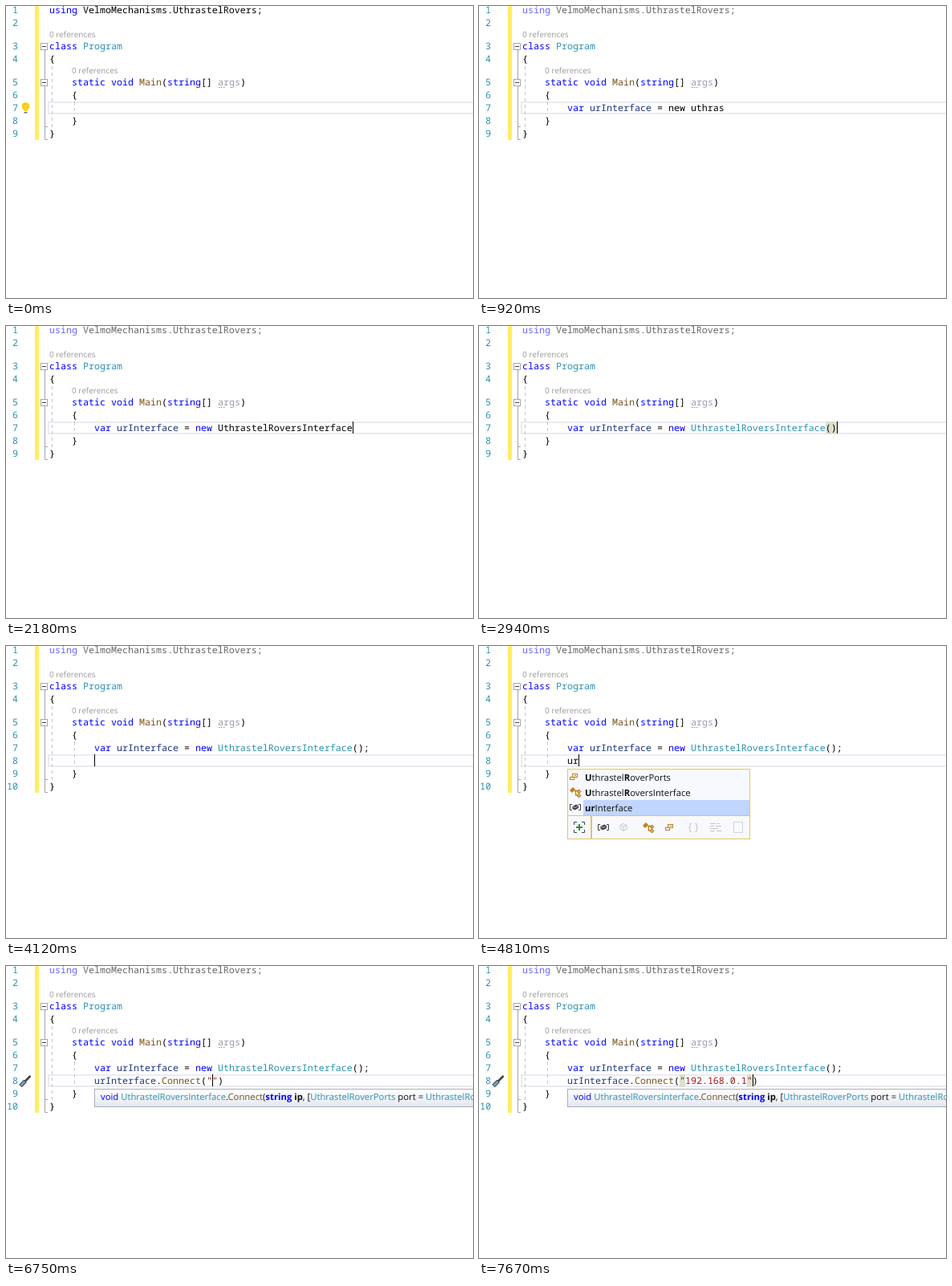
Recreate the animation shown at these times as an HTML page. Size 582 px wide and 364 px high, loop 8000 ms.

```html
<!DOCTYPE html>
<html lang="en">
<meta charset="utf-8">
<title>Code editor typing</title>
<style>
  html, body { margin: 0; height: 100%; overflow: hidden; background: #fff; }
  svg { display: block; }
  text { white-space: pre; text-rendering: geometricPrecision; }
  .code { font: 11.667px "Noto Sans Mono", monospace; }
  .ui { font: 11.3px "Open Sans", sans-serif; fill: #111; }
  .lens { font-size: 10px; fill: #999; }
  .bold { font-weight: 700; }
  .keyword { fill: #00f; }
  .local { fill: #1f377f; }
  .type, .number { fill: #2b91af; }
  .method { fill: #74531f; }
  .string { fill: #a31515; }
  .number { text-anchor: end; }
  .unused { fill: #999cae; }
</style>
<svg id="stage" width="582" height="364" viewBox="0 0 582 364"></svg>
<script>
const LOOP = 8000, CHAR = 7, INDENT = 110;
const PANEL = '#f7f9fe', GOLD = '#e5c365', ORANGE = '#c27d1a', GREY = '#c3c3c6', DARK = '#424242';
const stage = document.getElementById('stage');

const declare = 'var urInterface = new ';
const created = declare + 'UthrastelRoversInterface';
const call = 'urInterface.Connect';
const menuNew = (w, found, rest) => ({ x: 264, y: 137, w, selected: 1, items: [
  ['enum', `*${found}*${rest}RoverPorts`.replace('R*R', 'R*')],
  ['class', `*${found}*${rest}RoversInterface`.replace('R*R', 'R*')]] });
const menuLocal = typed => ({ x: 110, y: 153, w: 228, selected: 2, locals: true, items: [
  ['enum', '*U*thrastel*R*overPorts'], ['class', '*U*thrastel*R*oversInterface'],
  ['local', `*${typed}*${'urInterface'.slice(typed.length)}`]] });

// Each step changes part of the state. `done` counts the characters already coloured,
// `caret` and `marks` are column numbers.
const steps = [
  [0, { first: '', second: null, done: 0, bulb: true }],
  [80, { first: 'var', bulb: false }],
  [160, { first: 'var urInter' }],
  [240, { first: 'var urInterface', done: 16, caret: 15, dim: true }],
  [600, { caret: null }],
  [920, { first: declare + 'uthras' }],
  [1060, { done: 22, caret: 28 }],
  [1145, { menu: menuNew(172, 'Uthras', 'tel') }],
  [1530, { first: declare + 'uthrast', caret: null }],
  [1615, { first: declare + 'uthrastel', menu: menuNew(187, 'Uthrastel', '') }],
  [1700, { first: declare + 'uthrastelr', menu: menuNew(187, 'UthrastelR', '') }],
  [2180, { first: created, caret: 46, menu: null }],
  [2480, { done: 99 }],
  [2710, { bulb: true }],
  [2790, { first: created + '()', caret: 48, bulb: false }],
  [2940, { marks: [46, 47] }],
  [3320, { bulb: true }],
  [3420, { first: created + '();', caret: null, bulb: false }],
  [3580, { marks: [] }],
  [3880, { bulb: true }],
  [3960, { caret: 49 }],
  [4120, { second: '', done: 0, caret: 0, bulb: false }],
  [4590, { second: 'u', caret: 1 }],
  [4700, { menu: menuLocal('u') }],
  [4810, { second: 'ur', caret: 2, menu: menuLocal('ur') }],
  [5200, { caret: null }],
  [5350, { second: 'urInterface', menu: null }],
  [5435, { second: 'urInterface.Conn' }],
  [5520, { second: call }],
  [5820, { done: 11, caret: 19 }],
  [6220, { second: call + '()', caret: 20 }],
  [6300, { second: call + '("")', caret: 21, hint: true }],
  [6520, { done: 99 }],
  [6750, { tool: true }],
  [6830, { second: call + '("192.168")', caret: 28, tool: false }],
  [6910, { second: call + '("192.168.0.1")', caret: 32 }],
  [7300, { caret: null }],
  [7450, { tool: true }],
  [7530, { caret: 33 }],
  [7670, { marks: [20, 32] }],
];

const rect = (x, y, w, h, fill, more = '') =>
  `<rect x="${x}" y="${y}" width="${w}" height="${h}" fill="${fill}" ${more}/>`;
const line = (d, color, more = '') => `<path d="${d}" fill="none" stroke="${color}" ${more}/>`;
const text = (x, y, kind, content) => `<text x="${x}" y="${y}" class="${kind}">${content}</text>`;
const span = (kind, content) => `<tspan class="${kind}">${content}</tspan>`;

const kinds = ['keyword', 'type', 'local', 'method', 'string'];
const syntax = /\b(using|class|static|void|string|var|new)\b|(UthrastelRoversInterface|Program)|(urInterface)|(Main|Connect)|("[^"]*")/g;
const colour = source => source.replace(syntax, (word, ...groups) =>
  span(kinds[groups.slice(0, 5).findIndex(Boolean)], word));
const code = (x, y, source, done = 99) =>
  text(x, y, 'code', colour(source.slice(0, done)) + source.slice(done));

const icons = {
  class: () => `<path d="M-7-2l4-4 3 3-4 4z" fill="${ORANGE}"/>`
    + line('M-1-1.5H4M.5-1.5V4H2.500M4.500-2.500L6.500-.500 4.500 1.500 3-.500zM4.500 2.500L6.500 4.500 4.500 6.500 2.500 4.500z', ORANGE, 'stroke-width="1.300"'),
  enum: () => rect(-1.5, -3.5, 6, 4, PANEL, `stroke="${ORANGE}"`) + line('M.500-1.500H3', ORANGE)
    + rect(-4.5, .5, 5, 3, PANEL, `stroke="${ORANGE}"`),
  local: () => line('M-4-3.500H-6.500V3.500H-4M4-3.500H6.500V3.500H4', DARK)
    + `<path d="M-3.500-1L1-3.500 4-2V1L-.500 3.500-3.500 2z" fill="${DARK}"/>` + line('M-2.500-.500L0 .500 3-1.500', PANEL, 'stroke-width=".7"'),
  cube: () => line('M0-4.500L4-2.500V2L0 4.500-4 2V-2.500zM-4-2.500L0-.500 4-2.500M0-.500V4', GREY),
  braces: () => `<text y="4" text-anchor="middle" class="ui" style="fill:${GREY};font-size:13px">{ }</text>`,
  snippet: () => line('M-7-4.500H0M2-4.500H5M-7-1.500H-2M0-1.500H7M-7 1.500H3M-7 4.500H-1M1 4.500H7', GREY),
  blank: () => line('M-5.500-6.500H5.500V6.500H-5.500z', GREY, 'stroke-dasharray="2 1"'),
  expand: () => line('M-3-6.500H-6.500V-3M3-6.500H6.500V-3M-3 6.500H-6.500V3M3 6.500H6.500V3', DARK)
    + line('M-4 0H4M0-4V4', '#388a34', 'stroke-width="2"'),
};
const icon = (name, x, y) => `<g transform="translate(${x} ${y})">${icons[name]()}</g>`;

function menu({ x, y, w, items, selected, locals }) {
  const bar = y + 19 * items.length + 2;
  const shift = locals ? 56 : 0;
  let out = rect(x + .5, y + .5, w - 1, bar - y + 28, PANEL, `stroke="${GOLD}"`)
    + line(`M${x} ${bar - .5}h${w}`, GOLD)
    + rect(x + 29, bar, 2, 28, GOLD)
    + rect(x + 20, y + 1 + 19 * selected, w - 21, 19, '#c2d5ff');
  items.forEach(([kind, label], i) => {
    const middle = y + 10.5 + 19 * i;
    out += icon(kind, x + (kind === 'enum' ? 8 : 10), Math.floor(middle))
      + text(x + 22, middle + 4, 'ui', label.replace(/\*(.*?)\*/g, (_, found) => span('bold', found)));
  });
  const tools = [['expand', 15], ['class', 45 + shift], ['enum', 71 + shift],
    ['braces', 101 + shift], ['snippet', 129 + shift], ['blank', 157 + shift]];
  if (locals) tools.push(['local', 45], ['cube', 70]);
  return out + tools.map(([name, dx]) => icon(name, x + dx, bar + 14)).join('');
}

const bulb = y => `<circle cx="24.500" cy="${y + 6}" r="4.800" fill="#ffcc00"/>`
  + line(`M22.500 ${y + 5}l2 2 2-2M24.500 ${y + 7}v3`, '#fff3c0')
  + rect(22.5, y + 10, 4, 2, '#ffcc00') + rect(22.5, y + 13, 4, 1.5, '#6d6d6d');

const screwdriver = y => line(`M18 ${y + 14.5}L24 ${y + 8.5}`, DARK, 'stroke-width="5"')
  + line(`M18.500 ${y + 14}L23.500 ${y + 9}`, '#6fa3d0', 'stroke-width="3"')
  + line(`M23.500 ${y + 9}L30.500 ${y + 2}`, DARK, 'stroke-width="2.500"');

function hint() {
  const type = name => span('type', name);
  return rect(110.5, 153.5, 480, 22, 'url(#tip)', 'stroke="#a9adbb"')
    + text(118, 167, 'ui', span('keyword', 'void ') + type('UthrastelRoversInterface') + '.'
      + span('method', 'Connect') + '(' + span('bold', span('keyword', 'string') + ' ip') + ', ['
      + type('UthrastelRoverPorts') + ' port = ' + type('UthrastelRoverPorts') + '.Primary])');
}

function fold(end) {
  const box = y => rect(43.5, y + .5, 8, 8, '#fff', 'stroke="#a5a5a5"') + line(`M45 ${y + 4.5}h5`, DARK);
  return line(`M48.500 55V${end}H52M48.500 ${end - 16}H52`, '#a5a5a5') + box(46) + box(91);
}

function draw(s) {
  const extra = s.second === null ? 0 : 16;
  const row = 119 + extra;
  const column = n => INDENT + n * CHAR;
  const numbers = [9, 25, 54, 70, 99, 115, 131, 147, 163, 179].slice(0, extra ? 10 : 9);
  return `<defs><linearGradient id="tip" x2="0" y2="1"><stop stop-color="#fff"/><stop offset="1" stop-color="#e4e7f1"/></linearGradient></defs>`
    + rect(36, 0, 5, 167 + extra, '#ffee62')
    + rect(53, row + 1, 540, 14, 'none', 'stroke="#eaeaf2" stroke-width="2"')
    + line(`M57.500 75V${151 + extra}M85.500 119V${135 + extra}`, '#c4c4c4', 'stroke-dasharray="4 4"')
    + fold(166.5 + extra)
    + numbers.map((y, i) => text(15, y, 'code number', i + 1)).join('')
    + `<g opacity="${s.dim ? .6 : 1}">${code(54, 9, 'using VelmoMechanisms.UthrastelRovers;')}</g>`
    + text(54, 39, 'ui lens', '0 references') + code(54, 54, 'class Program') + code(54, 70, '{')
    + text(82, 84, 'ui lens', '0 references') + code(82, 99, 'static void Main(string[]')
    + text(264, 99, 'code unused', 'args') + code(292, 99, ')')
    + [265, 268, 271].map(x => rect(x, 101, 1.5, 1, '#8a8a8a')).join('')
    + code(82, 115, '{') + code(82, 147 + extra, '}') + code(54, 163 + extra, '}')
    + (s.marks || []).map(n => rect(column(n), row, CHAR, 16, '#dbe0cc')).join('')
    + code(INDENT, 131, s.first, extra ? 99 : s.done)
    + (extra ? code(INDENT, 147, s.second, s.done) : '')
    + (s.caret != null ? rect(column(s.caret), row, 1, 15, '#000') : '')
    + (s.bulb ? bulb(row) : '') + (s.tool ? screwdriver(row) : '')
    + (s.menu ? menu(s.menu) : '') + (s.hint ? hint() : '');
}

let shown = -1;
function tick() {
  const time = performance.now() % LOOP;
  const passed = steps.filter(([start]) => start <= time);
  if (passed.length !== shown) {
    shown = passed.length;
    stage.innerHTML = draw(Object.assign({}, ...passed.map(([, change]) => change)));
  }
  requestAnimationFrame(tick);
}
tick();
</script>
</html>
```
